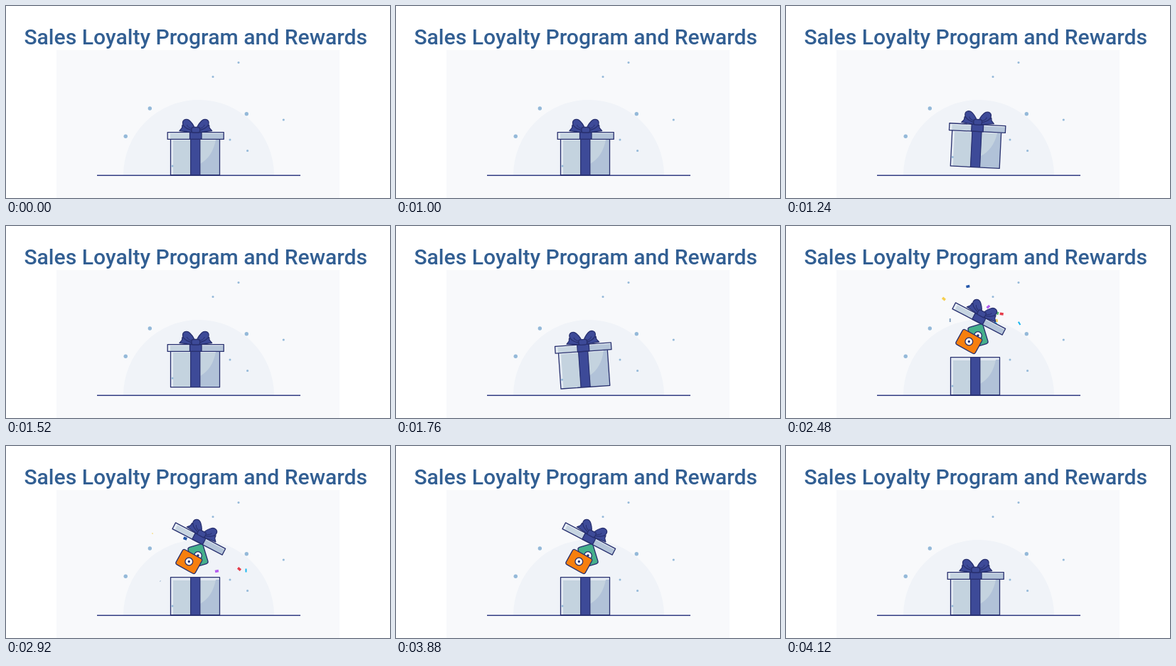
Animation of 540 by 270 pixels, one loop 4.8 s. Source, as an HTML page:

```html
<!DOCTYPE html>
<html lang="en">
<head>
<meta charset="utf-8">
<title>Sales Loyalty Program and Rewards</title>
<style>
  html, body { margin: 0; width: 100%; height: 100%; overflow: hidden; background: #fff; }
  svg { display: block; width: 540px; height: 270px; }
  text { font: 500 30.1px Roboto, Arial, sans-serif; fill: #325f93; }
  .ink { stroke: #28306f; stroke-width: 1.3; stroke-linejoin: round; }
  .bow { fill: #3d4a98; }
  .dot { fill: #94b9d9; }
</style>
</head>
<body>
<svg viewBox="0 0 540 270">
  <defs>
    <g id="wing" class="bow ink">
      <path d="M262 171.500L248 167.500L247.500 171.500L244 175.500L261 177.300Z"/>
      <path d="M266 175.500C258 175 248.500 170.500 248.500 164.500C248.500 159.500 254.500 157.500 258.500 161.500C262.500 165.500 265.500 170 266 175.500Z"/>
      <path d="M263 173C259 172 255 170 254.500 167" fill="none" stroke-width="1"/>
    </g>
    <g id="badge">
      <circle class="ink" r="5.300" fill="#fff" stroke-width=".8"/>
      <circle r="1.700" fill="#28306f"/>
    </g>
  </defs>

  <text x="25.400" y="54">Sales Loyalty Program and Rewards</text>
  <rect x="71" y="62" width="398" height="208" fill="#f8f9fb"/>
  <path d="M165 238A106 106 0 0 1 377 238Z" fill="#f0f3f8"/>
  <g id="dots" class="dot"></g>
  <g id="confetti"></g>
  <path d="M128 238.200H414" stroke="#333d83" stroke-width="1.500"/>

  <g id="cards">
    <g id="green">
      <rect class="ink" x="-11" y="-14.500" width="22" height="29" rx="3" fill="#45b08c"/>
      <use href="#badge"/>
    </g>
    <g id="orange">
      <rect class="ink" x="-15.500" y="-12" width="31" height="24" rx="3" fill="#f77f0e"/>
      <use href="#badge"/>
    </g>
  </g>

  <g id="box">
    <rect x="231.500" y="184.700" width="69" height="53" fill="#c4d3df"/>
    <path d="M231.500 184.700H300.500V189H235V237.700H231.500Z" fill="#e3eaf2"/>
    <path d="M300.500 188H295C292 204 285 215 273 222V237.700H300.500Z" fill="#b1c2d8"/>
    <rect x="259.500" y="184.700" width="13.500" height="53" fill="#3d4a98"/>
    <path d="M259.700 185V237.500M272.800 185V237.500" stroke="#28306f" stroke-width="1.200"/>
    <rect class="ink" x="231.500" y="184.700" width="69" height="53" fill="none"/>
    <circle class="dot" cx="234" cy="225" r="1.500"/>
    <g id="lid">
      <rect x="227.200" y="177.600" width="79" height="9.800" fill="#c7d5e1"/>
      <path d="M227.200 177.600H306.200V179.500H231V187.400H227.200Z" fill="#e5ecf3"/>
      <rect x="275" y="179.500" width="31" height="8" fill="#b4c4d9"/>
      <rect class="bow ink" x="258.500" y="177.600" width="16.500" height="9.800"/>
      <rect class="ink" x="227.200" y="177.600" width="79" height="9.800" fill="none"/>
      <use href="#wing"/>
      <use href="#wing" transform="translate(533.600 0) scale(-1 1)"/>
      <rect class="bow ink" x="261" y="170.500" width="11.600" height="7.500" rx="2.500"/>
    </g>
  </g>
</svg>
<script>
const LOOP = 4800, STEP = 40;
const $ = id => document.getElementById(id);
const svg = (tag, attrs, parent) => {
  const el = document.createElementNS("http://www.w3.org/2000/svg", tag);
  for (const k in attrs) el.setAttribute(k, attrs[k]);
  return parent.appendChild(el);
};
const clamp = v => Math.min(1, Math.max(0, v));
const mix = (a, b, u) => a + (b - a) * u;
const span = (t, from, to) => clamp((t - from) / (to - from));
const smooth = u => u * u * (3 - 2 * u);
const backOut = u => 1 + 2.7 * (u - 1) ** 3 + 1.7 * (u - 1) ** 2;

for (const [cx, cy, r] of [[327, 79.5, 1.5], [291, 99.5, 1.5], [202.3, 144, 2.7], [338.3, 151.8, 2.7],
  [390.3, 160, 1.6], [168.2, 183.3, 2.7], [315, 188, 1.5], [339.6, 203.5, 1.6]])
  svg("circle", { cx, cy, r }, $("dots"));

// Colour, place after the burst, place one fall later, life in falls
const bits = [
  ["#2457aa", 259, 95, 252, 130, 1.6],
  ["#f6cf4f", 235, 132.5, 206, 123, 1.1],
  ["#7f9fc0", 242, 132.3, 217, 190, 1.1],
  ["#b45cf0", 274.5, 109.5, 296.5, 176, 1.6],
  ["#e63c4a", 283, 130, 328, 173, 1.6],
  ["#18b6ee", 320.5, 152.5, 337.5, 175, 1.6]
];

let seed = 7;
const random = () => (seed = seed * 16807 % 2147483647) / 2147483647;
for (const fill of ["#54b86a", "#f2a33c", "#18b6ee", "#f6cf4f"]) {
  const x = mix(255, 290, random());
  bits.push([fill, x, 132, x + mix(-80, 110, random()), mix(150, 215, random()), .7]);
}
const pieces = bits.map(([fill]) => svg("rect", { x: -2.5, y: -2, width: 5, height: 4, fill }, $("confetti")));

function drawBit([, x1, y1, x2, y2, life], i, t) {
  const u = (t - 2120) / 800, fall = Math.max(0, u), burst = span(t, 2000, 2120);
  const x = mix(268, mix(x1, x2, fall), burst);
  const y = mix(165, mix(y1, y2, fall) - 104 * fall * (1 - fall), burst);
  const size = t > 2000 && y < 236 ? clamp((life - u) / .3) : 0;
  const flip = .75 + .25 * Math.cos(i * 2 + fall * 12);
  pieces[i].setAttribute("transform",
    `translate(${x} ${y}) rotate(${i * 50 - 35 + 55 * fall}) scale(${size} ${size * flip})`);
}

const place = (id, x, y, angle, px = 0, py = 0) =>
  $(id).setAttribute("transform", `translate(${x} ${y}) rotate(${angle} ${px} ${py})`);

function draw() {
  const t = Math.floor(performance.now() % LOOP / STEP) * STEP;

  // The closed box hops up and rocks
  const hop = smooth(span(t, 1000, 1120)) * (1 - smooth(span(t, 1800, 1920)));
  const tilt = -4 * hop * Math.cos((t - 1760) / 320 * 2 * Math.PI);
  place("box", tilt * .35, -11 * hop, tilt, 266.3, 212);

  // The lid and the cards spring out, then sink back
  const pop = start => backOut(span(t, start, start + 200));
  const open = pop(1920) * (1 - smooth(span(t, 3880, 4120)));
  place("lid", 4.6 * open, -52 * open, 27.5 * open, 266.7, 182.5);
  const sink = smooth(span(t, 3880, 4080));
  place("green", 270, mix(206, 154, pop(1960) * (1 - sink)), -17);
  place("orange", 257.3, mix(212, 162.5, pop(2064) * (1 - sink)), 29);
  $("cards").setAttribute("visibility", t > 1940 && t < 4100 ? "visible" : "hidden");

  bits.forEach((bit, i) => drawBit(bit, i, t));
  requestAnimationFrame(draw);
}
draw();
</script>
</body>
</html>
```
